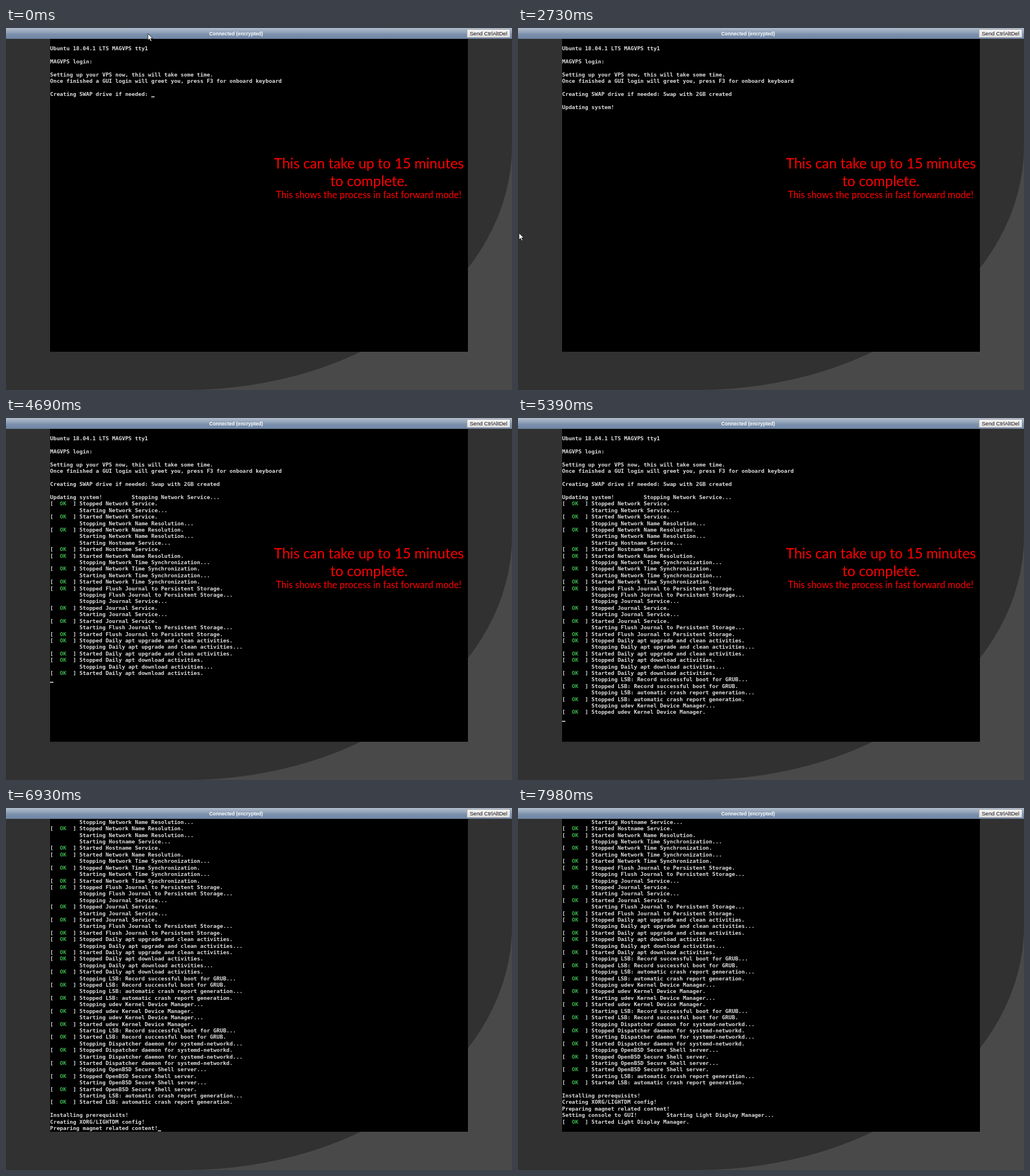
An HTML page with a canvas that plays this animation: 884 px wide and 634 px high, repeating every 8000 ms.

```html
<!DOCTYPE html>
<html lang="en">
<head>
<meta charset="utf-8">
<title>Console setup</title>
<style>
  html, body { margin: 0; width: 100%; height: 100%; overflow: hidden; background: #494949; }
  canvas { display: block; }
</style>
</head>
<body>
<canvas id="stage" width="884" height="634"></canvas>
<script>
const ctx = document.getElementById('stage').getContext('2d');
const LOOP = 8000, TICK = 70;
const SCALE = 0.713, LEFT = 77, TOP = 19.3;   // 1024 x 768 console shrunk to the page
const CELL_W = 8, CELL_H = 16, LAST_ROW = 47;
const INK = '#dedede', GREEN = '#39b54a';

const ok = text => '[  OK  ] ' + text + '.';
const act = text => ' '.repeat(9) + text + '...';
const begin = name => [act('Starting ' + name), ok('Started ' + name)];
const end = name => [act('Stopping ' + name), ok('Stopped ' + name)];

const NET = 'Network Service', DNS = 'Network Name Resolution', CLOCK = 'Network Time Synchronization';
const HOST = 'Hostname Service', FLUSH = 'Flush Journal to Persistent Storage', JOURNAL = 'Journal Service';
const UPGRADE = 'Daily apt upgrade and clean activities', FETCH = 'Daily apt download activities';
const GRUB = 'LSB: Record successful boot for GRUB', CRASH = 'LSB: automatic crash report generation';
const UDEV = 'udev Kernel Device Manager', DISPATCH = 'Dispatcher daemon for systemd-networkd';
const SSH = 'OpenBSD Secure Shell server';

const log = [
  '',
  'Ubuntu 18.04.1 LTS MAGVPS tty1',
  '',
  'MAGVPS login:',
  '',
  'Setting up your VPS now, this will take some time.',
  'Once finished a GUI login will greet you, press F3 for onboard keyboard',
  '',
  'Creating SWAP drive if needed: Swap with 2GB created',
  '',
  'Updating system!' + act('Stopping ' + NET),
  ok('Stopped ' + NET),
  ...begin(NET),
  ...end(DNS),
  act('Starting ' + DNS),
  ...begin(HOST),
  ok('Started ' + DNS),
  ...end(CLOCK),
  ...begin(CLOCK),
  ok('Stopped ' + FLUSH),
  act('Stopping ' + FLUSH),
  ...end(JOURNAL),
  ...begin(JOURNAL),
  ...begin(FLUSH),
  ok('Stopped ' + UPGRADE),
  act('Stopping ' + UPGRADE),
  ok('Started ' + UPGRADE),
  ok('Stopped ' + FETCH),
  act('Stopping ' + FETCH),
  ok('Started ' + FETCH),
  ...end(GRUB),
  ...end(CRASH),
  ...end(UDEV),
  ...begin(UDEV),
  ...begin(GRUB),
  ...end(DISPATCH),
  ...begin(DISPATCH),
  ...end(SSH),
  ...begin(SSH),
  ...begin(CRASH),
  '',
  'Installing prerequisits!',
  'Creating XORG/LIGHTDM config!',
  'Preparing magnet related content!',
  'Setting console to GUI!' + act('Starting Light Display Manager'),
  ok('Started Light Display Manager')
];

// Cursor position reached at each time: everything before it has been printed.
const prints = [
  [0, 8, 31], [2450, 10, 16], [3430, 13, 0], [3500, 15, 0], [3570, 18, 0],
  [3710, 22, 0], [3850, 27, 0], [3990, 32, 0], [4690, 38, 0], [4970, 40, 0],
  [5110, 42, 0], [5390, 44, 0], [5600, 46, 0], [5810, 48, 0], [6090, 52, 0],
  [6160, 58, 0], [6510, 59, 24], [6720, 60, 29], [6930, 61, 33],
  [7560, 62, 23], [7840, 63, 0], [7980, 64, 0]
];
// The cursor is lit at the start and flips at each of these times.
const blinks = [
  70, 210, 420, 700, 910, 1190, 1400, 1540, 1750, 1960, 2240, 2450, 2660, 2940,
  3220, 3430, 4270, 4690, 4830, 4970, 5250, 5390, 6020, 6090, 7070, 7280, 7630, 7770, 7980
];
const NOTICE_END = 6090;

const mousePath = [
  [0, 248, 10], [700, 248, 10], [1610, 118, 300], [1680, 95, 336],
  [1960, 84, 347], [2240, 84, 347], [2800, -10, 361]
];
const arrow = [[0, 0], [0, 11.5], [2.7, 9], [4.6, 13.3], [6.6, 12.4], [4.7, 8.3], [8.2, 8.1]];

function write(text, x, y, font, color, align = 'left') {
  ctx.font = font;
  ctx.fillStyle = color;
  ctx.textAlign = align;
  ctx.fillText(text, x, y);
}

function gradient(y0, y1, stops) {
  const fill = ctx.createLinearGradient(0, y0, 0, y1);
  stops.forEach(([at, color]) => fill.addColorStop(at, color));
  return fill;
}

function drawPage() {
  ctx.fillStyle = '#494949';
  ctx.fillRect(0, 0, 884, 634);
  ctx.fillStyle = '#313131';
  ctx.beginPath();
  ctx.moveTo(0, 0);
  ctx.lineTo(884, 0);
  ctx.ellipse(314, 206, 570, 428, 0, 0, Math.PI / 2);
  ctx.lineTo(0, 634);
  ctx.fill();

  ctx.fillStyle = '#000';
  ctx.fillRect(77, 19, 730, 548);
  ctx.fillStyle = gradient(0, 19, [[0, '#b2bdcd'], [0.49, '#899cb3'], [0.51, '#7e93af'], [1, '#6e84a3']]);
  ctx.fillRect(0, 0, 884, 19);
  write('Connected (encrypted)', 402, 13.4, 'bold 8.64px "Liberation Sans", Arial, sans-serif', '#fff', 'center');

  ctx.fillStyle = gradient(2, 17, [[0, '#f6f6f6'], [1, '#dedede']]);
  ctx.fillRect(805, 2, 76, 15);
  ctx.strokeStyle = '#a8a8a8';
  ctx.lineWidth = 1;
  ctx.strokeRect(805.5, 2.5, 75, 14);
  write('Send CtrlAltDel', 843, 13, '9.6px "Liberation Sans", Arial, sans-serif', '#111', 'center');
}

function drawConsole(t) {
  const [, row, col] = prints.filter(p => p[0] <= t).pop();
  const scroll = Math.max(0, row - LAST_ROW);
  const font = 'bold 13.29px "DejaVu Sans Mono", monospace';
  ctx.save();
  ctx.beginPath();
  ctx.rect(76, 19, 731, 548);
  ctx.clip();
  ctx.translate(LEFT, TOP);
  ctx.scale(SCALE, SCALE);
  for (let i = scroll; i <= row; i++) {
    const line = i < row ? log[i] : (log[i] || '').slice(0, col);
    const y = (i - scroll) * CELL_H + 12;
    write(line.replace('[  OK  ]', '[      ]'), 0, y, font, INK);
    if (line.startsWith('[')) write('OK', 3 * CELL_W, y, font, GREEN);
  }
  if (blinks.filter(b => b <= t).length % 2 === 0) {
    ctx.fillStyle = '#fff';
    ctx.fillRect(col * CELL_W, (row - scroll) * CELL_H + 13, CELL_W, 2);
  }
  ctx.restore();
}

function drawNotice() {
  const big = '24.7px Lato, sans-serif';
  write('This can take up to 15 minutes', 634, 246, big, '#f00', 'center');
  write('to complete.', 634, 277, big, '#f00', 'center');
  write('This shows the process in fast forward mode!', 633.5, 297.5, '16.4px Lato, sans-serif', '#f00', 'center');
}

function drawMouse(t) {
  const next = mousePath.findIndex(p => p[0] > t);
  if (next < 0) return;
  const [t0, x0, y0] = mousePath[next - 1], [t1, x1, y1] = mousePath[next];
  const k = (t - t0) / (t1 - t0);
  ctx.save();
  ctx.translate(x0 + (x1 - x0) * k, y0 + (y1 - y0) * k);
  ctx.beginPath();
  arrow.forEach(([x, y]) => ctx.lineTo(x, y));
  ctx.closePath();
  ctx.fillStyle = '#fff';
  ctx.fill();
  ctx.strokeStyle = '#000';
  ctx.lineWidth = 0.8;
  ctx.stroke();
  ctx.restore();
}

function frame(now) {
  const time = now % LOOP;
  const t = Math.floor(time / TICK) * TICK;
  drawPage();
  drawConsole(t);
  if (t < NOTICE_END) drawNotice();
  drawMouse(t);
  requestAnimationFrame(frame);
}
requestAnimationFrame(frame);
</script>
</body>
</html>
```
